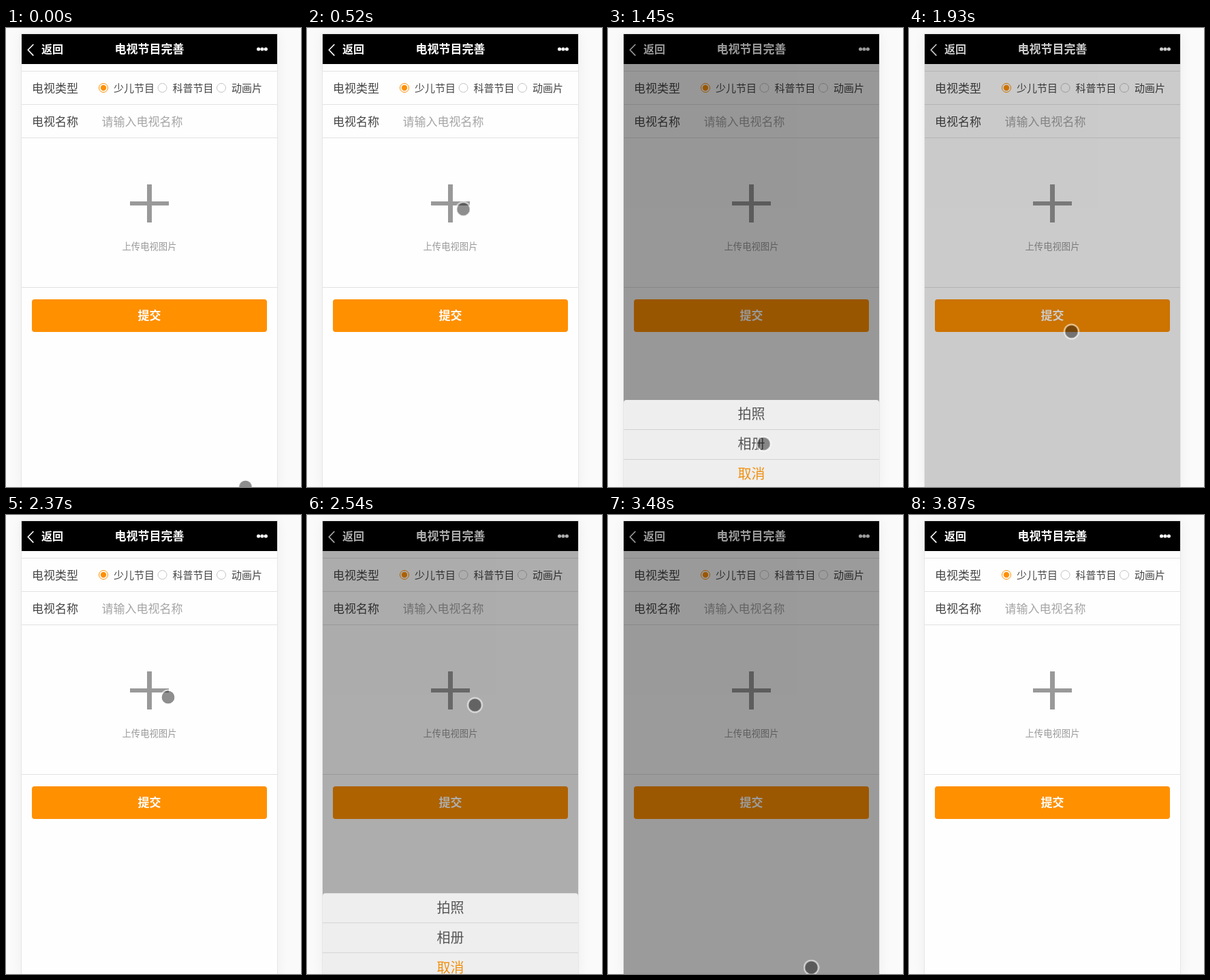
An HTML page for the animation above (3.95 s loop, 433 by 675 pixels).

```html
<!DOCTYPE html>
<html lang="zh-CN">
<head>
<meta charset="utf-8">
<style>
  html, body { margin: 0; width: 100%; height: 100%; overflow: hidden; background: #fafafa; }
  body { position: relative; }
  .phone { position: absolute; left: 23px; top: 9px; width: 375px; height: 667px; box-shadow: 0 0 0 1px #e6e6e6, 0 0 18px rgba(0, 0, 0, .06); }
  svg { position: absolute; left: 0; top: 0; width: 433px; height: 675px; font-family: "Noto Sans CJK SC", "Noto Sans CJK", sans-serif; }
  .mid { text-anchor: middle; }
  .bold { font-weight: 700; }
</style>
</head>
<body>
<div class="phone"></div>
<svg viewBox="0 0 433 675">
  <clipPath id="screen"><path d="M23 9h375v667H23z"/></clipPath>
  <g clip-path="url(#screen)">
    <path d="M23 9h375v667H23z" fill="#fefefe"/>
    <path d="M23 9h375v44H23z"/>
    <path d="M40.3 24l-8 8.3 8 8.3" fill="none" stroke="#fff" stroke-width="1.6"/>
    <path d="M370.6 31h11" fill="none" stroke="#fff" stroke-width="5.2" stroke-linecap="round" stroke-dasharray="0 5.4"/>
    <path d="M23 63h375v1H23zM23 112h375v1H23zM23 161h375v1H23zM23 381h375v1H23z" fill="#e2e2e2"/>
    <path d="M182 255h57v6H182zM207 230h7v56h-7z" fill="#999"/>
    <rect x="38" y="399" width="345" height="48" rx="4" fill="#ff9000"/>
    <g id="form"></g>
    <path id="dim" d="M23 9h375v667H23z"/>
    <g id="sheet">
      <path d="M23 690V551q0-4 4-4h367q4 0 4 4v139z" fill="#eee"/>
      <path d="M23 590h375v1H23zM23 634h375v1H23z" fill="#d2d2d2"/>
    </g>
  </g>
  <g id="cursor">
    <circle r="9.5" fill="#111" fill-opacity=".47"/>
    <circle r="10.5" fill="none" stroke="#fff" stroke-opacity=".65" stroke-width="2"/>
  </g>
</svg>
<script>
const LOOP = 3950;
const $ = id => document.getElementById(id);

function add(parent, tag, attrs, text = '') {
  const el = document.createElementNS('http://www.w3.org/2000/svg', tag);
  for (const name in attrs) el.setAttribute(name, attrs[name]);
  el.textContent = text;
  $(parent).append(el);
}

function label(parent, text, x, cy, size, fill, cls = '') {
  add(parent, 'text', { x, y: cy + size * 0.37, 'font-size': size, fill, class: cls }, text);
}

const MID = 210.5, INK = '#444';
label('form', '返回', 52, 31.5, 16, '#fff', 'bold');
label('form', '电视节目完善', MID, 31, 17, '#fff', 'bold mid');
label('form', '电视类型', 38, 88.5, 17, INK);
label('form', '电视名称', 38, 138, 17, INK);
label('form', '请输入电视名称', 140.5, 138, 17, '#a5a5a5');
label('form', '上传电视图片', MID, 321, 13.33, '#999', 'mid');
label('form', '提交', MID, 423, 17, '#fff', 'bold mid');

['少儿节目', '科普节目', '动画片'].forEach((text, i) => {
  const cx = 143 + 86.5 * i;
  add('form', 'circle', { cx, cy: 88, r: 6.5, fill: '#fff', stroke: i ? '#c4c4c4' : '#ff9000' });
  if (i === 0) add('form', 'circle', { cx, cy: 88, r: 4.2, fill: '#ff9000' });
  label('form', text, cx + 15, 88.5, 15, INK);
});

['拍照', '相册', '取消'].forEach((text, i) =>
  label('sheet', text, MID, 568 + 44 * i, 20, i < 2 ? '#555' : '#f09010', 'mid'));

// Keys are [ms, value, easing]; the end values are held to both ends of the loop.
function track(id, keys, style) {
  const first = keys[0], last = keys[keys.length - 1];
  const frames = [[0, first[1]], ...keys, [LOOP, last[1]]].map(([ms, value, easing = 'linear']) =>
    ({ offset: ms / LOOP, easing, ...style(value) }));
  const anim = $(id).animate(frames, { duration: LOOP, fill: 'both' });
  anim.pause();
  return anim;
}

const opacity = v => ({ opacity: v });
const move = ([x, y]) => ({ transform: `translate(${x}px, ${y}px)` });

// The sheet eases up and vanishes at once; the dimming fades both ways.
const OPENINGS = [[820, 1830], [2380, 3475]];
const FADE = 200, RISE = 236, DARK = 0.4;
const UP = [0, 0], DOWN = [0, 132];

const PLUS = [229.5, 266.5], CANCEL = [228.5, 661.5], RIGHT = [353.5, 652.5];
const tracks = [
  track('dim', OPENINGS.flatMap(([a, b]) =>
    [[a, 0], [a + FADE, DARK], [b, DARK], [b + FADE, 0]]), opacity),
  track('sheet', OPENINGS.flatMap(([a, b]) =>
    [[a, DOWN, 'ease'], [a + RISE, UP], [b, UP], [b, DOWN]]), move),
  track('cursor', [
    [20, [351.5, 675], 'ease-in-out'], [520, PLUS],
    [1140, PLUS, 'ease-in'], [1290, [228.5, 427.5]], [1440, [228.5, 611.5], 'ease-out'], [1690, CANCEL],
    [1770, CANCEL, 'ease-in'], [1930, [238.5, 446.5], 'ease-out'], [2370, [238, 268]],
    [2540, [246.5, 279.5]], [2620, [420, 440]], [2770, RIGHT],
    [3010, RIGHT, 'ease-out'], [3310, [286.5, 660.5]],
    [3480, [298.5, 665.5], 'ease-in'], [3870, [330, 692]]
  ], move)
];

// The picture updates in bursts of evenly spaced steps and holds in between.
const BURSTS = [
  [70, 520, 7], [830, 1290, 7], [1360, 1690, 5], [1850, 2370, 7],
  [2470, 2770, 5], [3090, 3310, 4], [3480, 3870, 6]
];

function hold(t) {
  const burst = BURSTS.filter(([from]) => from <= t).pop();
  if (!burst) return 0;
  const [from, to, count] = burst;
  const gap = (to - from) / (count - 1);
  const step = i => Math.floor((from + gap * i) / 10) * 10;
  let i = count - 1;
  while (step(i) > t) i--;
  return step(i);
}

const start = performance.now();
function draw() {
  const now = hold((performance.now() - start) % LOOP);
  for (const anim of tracks) anim.currentTime = now;
  requestAnimationFrame(draw);
}
draw();
</script>
</body>
</html>
```
